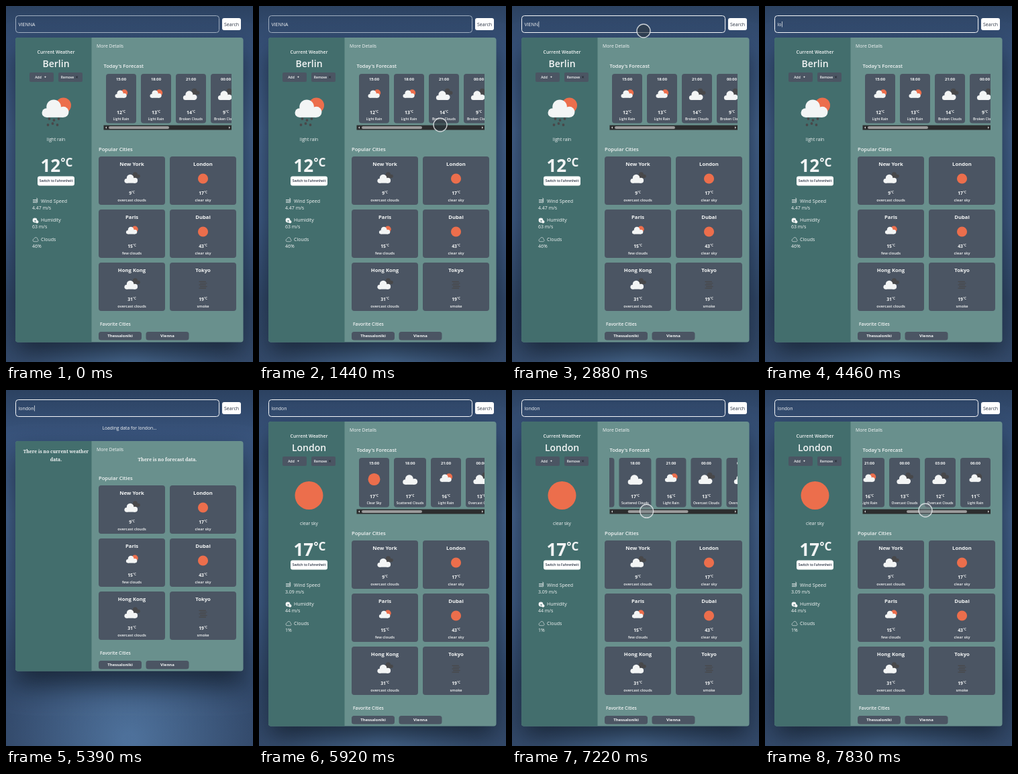
An HTML page with a canvas for the animation above (7.99 s loop, 368 by 530 pixels).

```html
<!DOCTYPE html>
<html lang="en">
<head>
<meta charset="utf-8">
<title>Weather search</title>
<style>
  html, body { margin: 0; width: 100%; height: 100%; overflow: hidden; background: #35507a; }
  canvas { display: block; width: 368px; height: 530px; }
</style>
</head>
<body>
<canvas width="368" height="530"></canvas>
<script>
const LOOP = 7990;
const SANS = '"Open Sans", "Noto Sans", sans-serif';
const SERIF = '"Noto Serif", serif';
const SLATE = '#4b5563', WHITE = '#f3f5f5', SUN = '#ec6e4c', DARK = '#48484a', INK = '#2b3444';
const ctx = document.querySelector('canvas').getContext('2d');

const places = {
  Berlin: {
    sky: 'rain', label: 'light rain', temp: 12, stats: ['4.47 m/s', '63 m/s', '46%'],
    // hour, icon, degrees, label, card width
    hours: [
      ['15:00', 'few', 12, 'Light Rain', 45], ['18:00', 'few', 13, 'Light Rain', 45],
      ['21:00', 'broken', 14, 'Broken Clouds', 45], ['00:00', 'broken', 9, 'Broken Clouds', 45]
    ]
  },
  London: {
    sky: 'clear', label: 'clear sky', temp: 17, stats: ['3.09 m/s', '44 m/s', '1%'],
    hours: [
      ['15:00', 'clear', 17, 'Clear Sky', 45], ['18:00', 'scattered', 17, 'Scattered Clouds', 48],
      ['21:00', 'few', 16, 'Light Rain', 45], ['00:00', 'broken', 13, 'Overcast Clouds', 46],
      ['03:00', 'broken', 12, 'Overcast Clouds', 46], ['06:00', 'night', 11, 'Light Rain', 45]
    ]
  }
};

const popular = [
  ['New York', 'broken', 9, 'overcast clouds'], ['London', 'clear', 17, 'clear sky'],
  ['Paris', 'few', 15, 'few clouds'], ['Dubai', 'clear', 43, 'clear sky'],
  ['Hong Kong', 'broken', 31, 'overcast clouds'], ['Tokyo', 'smoke', 19, 'smoke']
];

const typing = [
  [0, 'VIENNA'], [2880, 'VIENN'], [3050, 'VIEN'], [3190, 'VIE'], [3330, 'VI'], [3460, 'V'], [3590, ''],
  [3910, 'l'], [4460, 'lo'], [4540, 'lon'], [4760, 'lond'], [4870, 'londo'], [5090, 'london']
];

// time, x, y
const pointerPath = [
  [1840, 270, 177], [2530, 196, 37], [6130, 196, 37], [6600, 215, 189],
  [6900, 181, 181], [6940, 181, 181], [7660, 239, 179]
];

const ramp = (t, a, b) => Math.min(1, Math.max(0, (t - a) / (b - a)));
const ease = u => u * u * (3 - 2 * u);

function box(x, y, w, h, r, fill) {
  ctx.beginPath();
  ctx.roundRect(x, y, w, h, r);
  ctx.fillStyle = fill;
  ctx.fill();
}

function disc(x, y, r, fill) {
  ctx.beginPath();
  ctx.arc(x, y, r, 0, 7);
  ctx.fillStyle = fill;
  ctx.fill();
}

// y is the middle of the capitals
function text(str, x, y, size, { weight = 400, align = 'center', color = WHITE, family = SANS } = {}) {
  ctx.font = `${weight} ${size}px ${family}`;
  ctx.textAlign = align;
  ctx.fillStyle = color;
  ctx.fillText(str, x, y + size * 0.36);
  return ctx.measureText(str).width;
}

function degrees(n, x, y, size) {
  const unit = size * 0.66;
  ctx.font = `700 ${size}px ${SANS}`;
  const num = ctx.measureText(n).width;
  ctx.font = `700 ${unit}px ${SANS}`;
  const left = x - (num + ctx.measureText('°C').width) / 2;
  text(n, left, y, size, { weight: 700, align: 'left' });
  text('°C', left + num, y - size * 0.18, unit, { weight: 700, align: 'left' });
}

function cloud(x, y, w, fill) {
  disc(x + w * 0.17, y + w * 0.5, w * 0.17, fill);
  disc(x + w * 0.44, y + w * 0.28, w * 0.27, fill);
  disc(x + w * 0.8, y + w * 0.47, w * 0.2, fill);
  ctx.fillRect(x + w * 0.17, y + w * 0.35, w * 0.63, w * 0.32);
}

function icon(kind, x, y, scale) {
  ctx.save();
  ctx.translate(x, y);
  ctx.scale(scale, scale);
  if (kind === 'clear') disc(0, 0, 21, SUN);
  if (kind === 'scattered') cloud(-25, -16, 51, WHITE);
  if (kind === 'broken') {
    cloud(-2, -24, 32, DARK);
    cloud(-27, -16, 48, WHITE);
  }
  if (kind === 'few' || kind === 'rain' || kind === 'night') {
    disc(11, -9, 11.5, kind === 'night' ? DARK : SUN);
    cloud(-21, -18, 40, WHITE);
  }
  if (kind === 'rain') {
    for (let i = 0; i < 6; i++) disc(-10 + (i % 3) * 7 - (i > 2) * 2, 11 + (i > 2) * 7 + (i % 2) * 2, 1.9, DARK);
  }
  if (kind === 'smoke') {
    for (let i = 0; i < 5; i++) box(-15 + (i % 2) * 4, -13 + i * 6, 26, 3, 1.5, DARK);
  }
  ctx.restore();
}

function background() {
  let g = ctx.createLinearGradient(0, 0, 0, 530);
  [[0, '#2c4261'], [0.12, '#37527a'], [0.35, '#45648f'], [0.6, '#3f5d87'], [0.82, '#324a6c'], [1, '#33496a']]
    .forEach(([at, c]) => g.addColorStop(at, c));
  ctx.fillStyle = g;
  ctx.fillRect(0, 0, 368, 530);
  g = ctx.createRadialGradient(184, 520, 10, 184, 520, 190);
  g.addColorStop(0, 'rgba(84,122,166,.8)');
  g.addColorStop(1, 'rgba(84,122,166,0)');
  ctx.fillStyle = g;
  ctx.fillRect(0, 300, 368, 230);
}

function searchBar(t) {
  const value = typing.filter(k => k[0] <= t).pop()[1];
  const focused = t >= 2530;
  ctx.beginPath();
  ctx.roundRect(14.5, 14.5, 303, 25, 4);
  ctx.strokeStyle = focused ? '#f4f6f8' : '#9fadbf';
  ctx.lineWidth = 1;
  ctx.stroke();
  const w = text(value, 18.5, 27.5, 7, { align: 'left' });
  if (focused && t < 5610) {
    ctx.fillStyle = WHITE;
    ctx.fillRect(19 + w, 23, 0.7, 8.5);
  }
  box(322, 18, 28, 18, 3, '#fff');
  text('Search', 336, 27.5, 7, { color: INK });
}

function panel(top, bottom) {
  ctx.save();
  ctx.shadowColor = 'rgba(12,20,32,.7)';
  ctx.shadowBlur = 38;
  ctx.shadowOffsetY = 20;
  box(14, top, 339.5, bottom - top, 4, '#69908d');
  ctx.restore();
  box(14, top, 113.5, bottom - top, [4, 0, 0, 4], '#436e6d');
}

function statIcon(i, y) {
  ctx.strokeStyle = WHITE;
  ctx.lineWidth = 0.8;
  if (i === 1) {
    disc(43, y, 3.4, WHITE);
    disc(46.2, y + 2.2, 2.2, WHITE);
    disc(43.5, y + 1, 1, '#436e6d');
    return;
  }
  ctx.beginPath();
  if (i === 0) {
    for (let k = -1; k < 2; k++) {
      ctx.moveTo(40, y + k * 2);
      ctx.lineTo(45, y + k * 2);
      ctx.arc(45.5, y + k * 2 - 1, 1.3, 1.6, -1.8, true);
    }
  } else {
    ctx.globalAlpha = 0.7;
    ctx.arc(42, y + 1.2, 2, 1.57, 4.4);
    ctx.arc(44.5, y - 0.6, 2.4, 3.5, 6);
    ctx.arc(46.3, y + 1.4, 1.8, 5, 1.57);
    ctx.closePath();
  }
  ctx.stroke();
  ctx.globalAlpha = 1;
}

function current(name, place) {
  text('Current Weather', 74.5, 69, 6.9, { weight: 600 });
  text(name, 74.5, 85.5, 14, { weight: 600 });
  box(35, 99, 36, 14, 2, SLATE);
  box(78, 99, 36, 14, 2, SLATE);
  text('Add', 48, 106, 5, { weight: 600 });
  text('+', 58.5, 106, 6, { weight: 700 });
  text('Remove', 91.5, 106, 5, { weight: 600 });
  text('✕', 105.5, 106, 6, { weight: 700, color: '#20242b', family: '"DejaVu Sans", sans-serif' });
  icon(place.sky, 74.5, 157, 1);
  text(place.label, 74.5, 198.5, 6.7);
  degrees(place.temp, 75.5, 238, 26);
  box(47, 253.5, 55, 14, 3, '#fff');
  text('Switch to Fahrenheit', 74.5, 260.5, 5, { weight: 600, color: INK });
  ['Wind Speed', 'Humidity', 'Clouds'].forEach((label, i) => {
    const y = 290 + i * 28.5;
    statIcon(i, y + 0.5);
    text(label, 52, y, 7, { align: 'left' });
    text(place.stats[i], 39, y + 10.3, 7, { align: 'left' });
  });
}

function arrow(x, dir) {
  ctx.beginPath();
  ctx.moveTo(x - dir, 179.3);
  ctx.lineTo(x + dir, 181);
  ctx.lineTo(x - dir, 182.7);
  ctx.fillStyle = '#d5d5d5';
  ctx.fill();
}

function forecast(hours, scroll) {
  text("Today's Forecast", 145.5, 89.5, 7.5, { weight: 600, align: 'left' });
  ctx.save();
  ctx.beginPath();
  ctx.rect(145, 99, 191, 77);
  ctx.clip();
  let x = 149 - 123 * scroll;
  for (const [hour, sky, temp, label, w] of hours) {
    const mid = x + w / 2;
    box(x, 101, w, 73.5, 4, SLATE);
    text(hour, mid, 108.5, 5.8, { weight: 700 });
    icon(sky, mid, 133, 0.43);
    degrees(temp, mid, 158.5, 7);
    text(label, mid, 168, 5, { weight: 600 });
    x += w + 7;
  }
  ctx.restore();
  box(145.5, 177.5, 190.5, 7, 0, '#2c2d2e');
  box(153 + 58 * scroll, 179, 90, 4, 2, '#9b9b9b');
  arrow(149, -1);
  arrow(333, 1);
}

function cities(dy) {
  ctx.save();
  ctx.translate(0, dy);
  text('Popular Cities', 138, 213, 7.6, { weight: 600, align: 'left' });
  popular.forEach(([name, sky, temp, label], i) => {
    const x = 138 + (i % 2) * 106, y = 224 + Math.floor(i / 2) * 79, mid = x + 49.5;
    box(x, y, 99, 72, 4, SLATE);
    text(name, mid, y + 11, 7.7, { weight: 700 });
    icon(sky, mid, y + 33, sky === 'clear' ? 0.36 : 0.41);
    degrees(temp, mid, y + 54.5, 6.8);
    text(label, mid, y + 65, 5.7, { weight: 600 });
  });
  text('Favorite Cities', 140, 474, 6.7, { weight: 600, align: 'left' });
  ['Thessaloniki', 'Vienna'].forEach((name, i) => {
    box(138 + i * 70.5, 485, 64, 12.5, 3.5, SLATE);
    text(name, 170 + i * 70.5, 491.3, 6, { weight: 700 });
  });
  ctx.restore();
}

function pointer(t) {
  const alpha = ramp(t, 270, 350) - ramp(t, 3910, 4070) + ramp(t, 6130, 6210);
  if (alpha <= 0) return;
  let [, x, y] = pointerPath[0];
  for (let i = 1; i < pointerPath.length; i++) {
    const [a, ax, ay] = pointerPath[i - 1], [b, bx, by] = pointerPath[i];
    if (t < a) break;
    const u = ease(ramp(t, a, b));
    x = ax + (bx - ax) * u;
    y = ay + (by - ay) * u;
  }
  ctx.globalAlpha = alpha;
  disc(x, y, 10, t > 6940 ? 'rgba(120,130,135,.45)' : 'rgba(45,55,62,.6)');
  ctx.strokeStyle = 'rgba(228,232,234,.85)';
  ctx.lineWidth = 1.4;
  ctx.stroke();
  ctx.globalAlpha = 1;
}

function draw(t) {
  const loading = t >= 5390 && t < 5610;
  const name = t < 5390 ? 'Berlin' : 'London';
  background();
  panel(loading ? 76 : 47, loading ? 418.5 : 500.5);
  searchBar(t);
  text('More Details', 135, loading ? 88.5 : 59.5, 6.8, { align: 'left' });
  if (loading) {
    const serif = { weight: 700, family: SERIF };
    text('Loading data for london...', 184, 56.5, 6.75);
    text('There is no current weather', 74.5, 91.5, 6.85, serif);
    text('data.', 74.5, 103.5, 6.85, serif);
    text('There is no forecast data.', 240.5, 103.5, 6.85, serif);
  } else {
    current(name, places[name]);
    forecast(places[name].hours, ease(ramp(t, 6940, 7660)));
  }
  cities(loading ? -82 : 0);
  pointer(t);
}

const start = performance.now();
function tick() {
  draw((performance.now() - start) % LOOP);
  requestAnimationFrame(tick);
}
tick();
</script>
</body>
</html>
```
